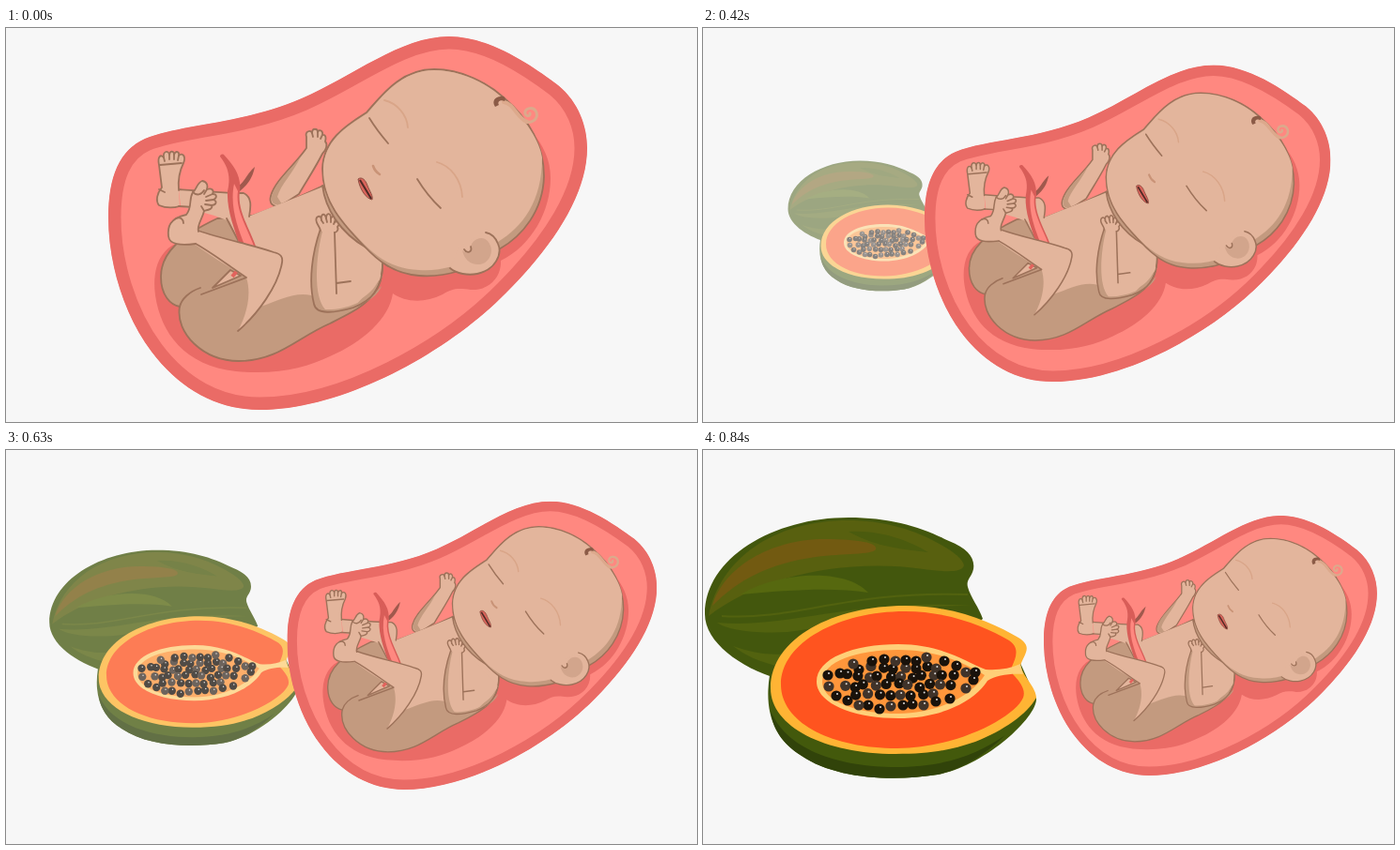
An HTML page that plays this animation: 736 by 420 pixels, repeating every 0.91 s.

```html
<!DOCTYPE html>
<html lang="en">
<head>
<meta charset="utf-8">
<title>Papaya and baby</title>
<style>
  html, body { margin: 0; width: 100%; height: 100%; overflow: hidden; background: #f7f7f7; }
  svg { display: block; width: 736px; height: 420px; }
  .skin { fill: #e3b59c; }
  .shade { fill: #c39a7f; }
  .edge { stroke: #9d725a; stroke-width: 1.8; stroke-linecap: round; stroke-linejoin: round; }
  .line { fill: none; }
  .brow { fill: none; stroke: #d9a588; stroke-width: 1.8; stroke-linecap: round; }
</style>
</head>
<body>
<svg viewBox="0 0 736 420">
  <defs>
    <path id="sac" d="M109 202C109 158 121 130 148 118C188 102 250 103 315 75C369 52 420 9 472 9C515 9 560 40 588 61C610 79 619 105 619 128C619 176 585 230 533 282C470 346 360 407 270 407C225 407 185 385 155 345C125 305 109 250 109 202Z"/>
    <clipPath id="inside"><use href="#sac"/></clipPath>
  </defs>

  <g id="papaya">
    <!-- whole fruit -->
    <path fill="#43570d" d="M2 175C2 115 75 72 155 72C200 72 232 82 262 97C282 105 290 115 288 127C286 136 280 138 282 146C285 157 294 168 298 180L200 250L80 244C40 232 2 205 2 175Z"/>
    <path fill="#58600f" d="M6 177C18 116 75 75 155 75C190 75 222 84 246 97C264 106 277 116 278 123C276 131 258 130 235 127C150 115 60 135 6 177Z"/>
    <path fill="#4b5b0e" d="M155 87C190 85 220 97 240 109C215 106 185 104 155 87Z"/>
    <path fill="#725a11" d="M10 166C22 125 72 95 130 95C165 95 187 99 184 106C180 112 150 110 120 114C70 121 38 138 10 166Z"/>
    <path fill="#56680f" d="M40 154C78 131 150 124 176 152C140 146 90 149 40 154Z"/>
    <path fill="#52620f" d="M15 184C90 191 160 158 285 166C200 164 150 188 90 194C50 196 25 191 15 184ZM32 209C55 217 75 220 95 216L82 231C60 226 45 219 32 209Z"/>
    <path fill="none" stroke="#52620f" stroke-width="2" d="M20 177C100 182 150 150 282 154"/>
    <!-- cut half -->
    <path fill="#43590c" d="M71 240C65 278 75 308 105 326C140 350 200 354 250 346C300 337 356 285 355 265L337 225Z"/>
    <path fill="#31430a" d="M72 278C90 322 150 338 205 338C255 338 290 326 322 304C301 324 278 340 250 346C200 354 140 350 105 326C84 313 74 296 72 278Z"/>
    <path fill="#ffb434" d="M72 254C72 200 140 166 215 166C270 166 310 185 336 200C352 210 342 217 338 230C342 243 354 252 355 264C345 282 320 299 290 311C260 321 240 324 205 324C130 324 72 295 72 254Z"/>
    <path fill="#ff541f" d="M83 250C83 205 145 172 215 172C262 172 300 188 326 203C338 211 333 222 329 231L330 239C338 247 344 256 341 264C332 285 270 318 207 318C135 318 83 290 83 250Z"/>
    <path fill="#ffcf78" d="M121 247C121 222 160 207 208 207C255 207 280 226 301 234C315 235 327 233 338 228L341 239C327 238 312 240 303 246C290 267 255 286 208 286C160 286 121 270 121 247Z"/>
    <path fill="#ff963b" d="M127 247C127 225 165 213 208 213C252 213 281 229 300 240C288 260 252 281 208 281C163 281 127 268 127 247Z"/>
    <g id="seeds"></g>
  </g>

  <g id="womb">
    <use href="#sac" fill="#ff8880" stroke="#ea6b66" stroke-width="27" clip-path="url(#inside)"/>
    <path fill="#ea6b66" d="M185 228C165 235 155 255 159 285C165 325 190 360 245 366C290 370 320 362 345 350C380 335 408 310 412 283C425 292 445 294 465 284C475 278 480 277 495 279C515 280 528 265 527 248C560 232 580 195 580 160C580 140 572 125 560 110L400 200Z"/>

    <!-- far arm -->
    <path class="skin edge" d="M320 128L320 116C318 110 325 108 326 112C326 106 332 107 332 111C334 107 338 110 337 114C341 113 341 118 340 121C343 124 341 130 337 134C330 148 322 160 312 177L292 190C284 191 280 187 282 179C287 162 306 148 320 128Z"/>
    <path class="shade" d="M283 179C287 164 304 150 314 137C306 154 292 168 289 180L294 188C285 190 282 186 283 179Z"/>
    <path class="edge line" d="M326 112L327 116M332 111L332 116M337 114L335 118"/>

    <!-- body -->
    <path class="shade edge" d="M338 168C310 181 285 192 262 200L225 203C185 222 165 240 165 265C165 285 175 295 185 297C180 325 210 355 248 355C290 355 310 330 345 315C375 300 402 288 401 250Z"/>
    <path class="skin" d="M338 169L258 201L246 226L294 250C291 270 278 288 271 297C290 291 307 281 325 285L345 299C380 294 401 278 400 250Z"/>
    <path class="edge line" d="M185 297C187 289 195 281 207 277"/>

    <!-- far leg -->
    <path class="skin" d="M184 172C210 174 235 176 253 176C262 180 261 190 259 201L248 228L238 206L222 200L186 190Z"/>
    <path class="edge line" d="M184 172C210 174 235 176 253 176C262 180 261 190 259 201M235 203L247 226"/>
    <path class="skin edge" d="M185 190C178 192 170 192 163 189C159 184 161 176 166 170L163 146C161 137 165 134 168 138C167 131 173 130 174 135C175 130 179 131 179 135C181 130 185 132 184 136C188 132 192 137 189 144C184 154 183 162 184 173"/>
    <path class="edge line" d="M164 146L187 144M168 138L169 142M174 135L174 140M179 135L179 140M184 136L183 141M163 172L169 175M184 190L200 191"/>
    <path class="skin edge" d="M220 277L239 258L250 264Z"/>
    <path fill="none" stroke="#e3635d" stroke-width="4" d="M241 265L246 259"/>

    <!-- cord -->
    <path fill="#a0594d" d="M265 148C263 158 259 166 249 174L248 168C254 164 257 155 265 148Z"/>
    <path fill="#d85d58" d="M228 137C238 150 239 160 236 174C235 194 243 213 248 229L267 235C259 213 246 194 249 174C251 158 243 147 232 135C230 134 228 135 228 137Z"/>
    <path fill="#ff8880" d="M243 166C238 190 247 213 254 231L265 235C257 213 244 194 247 174Z"/>

    <!-- near leg -->
    <path class="skin" d="M173 222C172 212 177 202 192 198L200 205L205 215C230 225 262 231 285 239C293 241 295 244 294 250C290 275 268 305 247 323C256 306 262 285 256 266L225 247L200 230C186 232 174 231 173 222Z"/>
    <path class="edge line" d="M205 216C230 225 262 231 285 239C293 241 295 244 294 250C290 275 268 305 247 323M202 230C220 240 238 254 256 266L208 284"/>
    <path class="skin edge" d="M202 230C186 232 174 231 173 222C172 212 174 203 192 199C199 190 194 184 199 175C203 173 203 165 209 163C215 164 215 169 214 172C219 170 222 173 220 177C225 177 225 181 221 183C226 185 223 189 219 189C221 193 215 194 211 195C209 204 203 210 205 217"/>
    <path class="edge line" d="M199 175C203 179 208 178 211 173M214 172L211 177M220 177L213 180M221 183L213 184M219 189L212 188M211 195L208 190M181 203C186 201 189 204 189 208"/>

    <!-- near arm -->
    <path class="skin" d="M335 214C326 240 322 270 328 294C330 306 350 304 370 298L401 265L354 214Z"/>
    <path class="shade" d="M335 216C326 240 322 270 328 294C330 306 350 304 370 298C386 292 397 284 400 275C385 292 360 301 340 300C326 285 331 240 337 217Z"/>
    <path class="edge line" d="M335 214C326 240 322 270 328 294C330 306 350 304 370 298C388 291 402 279 401 250"/>
    <path class="skin edge" d="M335 216C334 210 328 207 331 202C334 199 336 202 336 205C335 197 340 197 341 203C341 196 346 197 346 203C349 198 352 202 350 207C355 204 356 209 353 212C355 216 351 218 350 218"/>
    <path class="edge line" d="M350 218L352 283M352 272L367 270M336 205L338 208M341 203L342 207M346 203L346 207M350 207L349 209"/>

    <!-- neck and head -->
    <path class="shade edge" d="M337 168C340 192 355 218 385 235L381 220Z"/>
    <path class="shade edge" d="M337 150C338 120 360 105 384 90C400 72 420 44 456 44C485 44 512 58 530 74C558 98 573 125 573 158C572 195 550 222 525 236C500 258 465 266 440 264C412 262 395 247 381 232C358 208 337 185 337 150Z"/>
    <path class="skin" d="M338 150C339 121 361 106 385 91C401 73 421 45 456 45C485 45 512 59 529 75C554 97 569 122 571 138C571 185 550 212 524 228C500 250 465 260 440 258C414 257 397 246 382 231C359 207 338 185 338 150Z"/>
    <path class="edge line" d="M387 96Q395 109 407 123M438 161Q449 179 463 192"/>
    <path class="brow" d="M403 77C416 80 427 92 428 106M459 143C474 147 485 162 486 180"/>
    <path fill="none" stroke="#c99377" stroke-width="2.6" stroke-linecap="round" d="M391 147Q393 153 398 156"/>
    <path fill="#d9645b" stroke="#8c4f42" d="M375 161C379 158 383 162 385 168C388 175 391 179 390 183C384 182 377 173 375 161Z"/>
    <path fill="none" stroke="#4d2a25" stroke-width="2" d="M377 162Q383 172 389 182"/>
    <path fill="none" stroke="#dca98c" stroke-width="4" stroke-linecap="round" d="M530 79C541 80 544 96 555 100"/>
    <path fill="none" stroke="#dca98c" stroke-width="3" stroke-linecap="round" d="M552 99C560 103 567 97 565 90C562 83 552 85 553 91C554 95 559 94 558 91"/>
    <path fill="#8b5b47" d="M521 84C517 78 521 73 527 73C531 72 533 76 531 78C526 76 523 79 525 82Z"/>

    <!-- ear -->
    <path class="skin" d="M473 256C480 262 492 264 502 262C521 258 529 241 524 230C521 222 514 218 508 218L482 233Z"/>
    <path class="edge line" d="M473 256C480 262 492 264 502 262C521 258 529 241 524 230C521 222 516 219 511 218"/>
    <path fill="#d2a58c" d="M495 233C497 225 507 221 513 227C521 236 516 250 505 252C495 253 488 247 486 237C491 242 496 240 495 233Z"/>
    <path class="edge line" d="M488 236C491 241 497 239 495 233"/>
  </g>
</svg>
<script>
  const STEP = 70, STEPS = 13;
  const papaya = document.getElementById('papaya');
  const womb = document.getElementById('womb');

  // Seeds: an outer ring, then jittered rows inside it.
  const ring = [[133,240],[146,238],[160,228],[180,225],[193,223],[205,225],[216,224],[227,225],
    [238,221],[257,225],[270,230],[280,237],[290,237],[288,245],[280,254],[263,265],[248,268],
    [235,272],[223,271],[213,272],[200,273],[188,276],[176,272],[166,272],[154,267],[142,262],[134,252]];
  let seed = 7;
  const random = () => (seed = seed * 16807 % 2147483647) / 2147483647;
  const points = [];
  [[232, 168, 258], [241, 152, 268], [251, 149, 270], [261, 163, 252]].forEach(([y, from, to]) => {
    for (let x = from; x <= to; x += 11.5) points.push([x + random() * 5 - 2, y + random() * 5 - 2.5]);
  });
  document.getElementById('seeds').innerHTML = points.concat(ring).map(([x, y], i) =>
    `<circle cx="${x}" cy="${y}" r="5.6" fill="${i % 3 === 1 ? '#40332a' : '#19120b'}"/>` +
    `<circle cx="${x + 1}" cy="${y - 2}" r="1" fill="#ddd"/>`).join('');

  function draw(now) {
    const p = Math.floor(now / STEP) % STEPS / (STEPS - 1);
    papaya.setAttribute('opacity', p);
    papaya.setAttribute('transform', `translate(${179 * (1 - p)} ${211 * (1 - p)}) scale(${p})`);
    womb.setAttribute('transform', `translate(${287.1 * p} ${63.7 * p}) scale(${1 - 0.304 * p})`);
  }

  const start = performance.now();
  function tick() {
    draw(performance.now() - start);
    requestAnimationFrame(tick);
  }
  tick();
</script>
</body>
</html>
```
